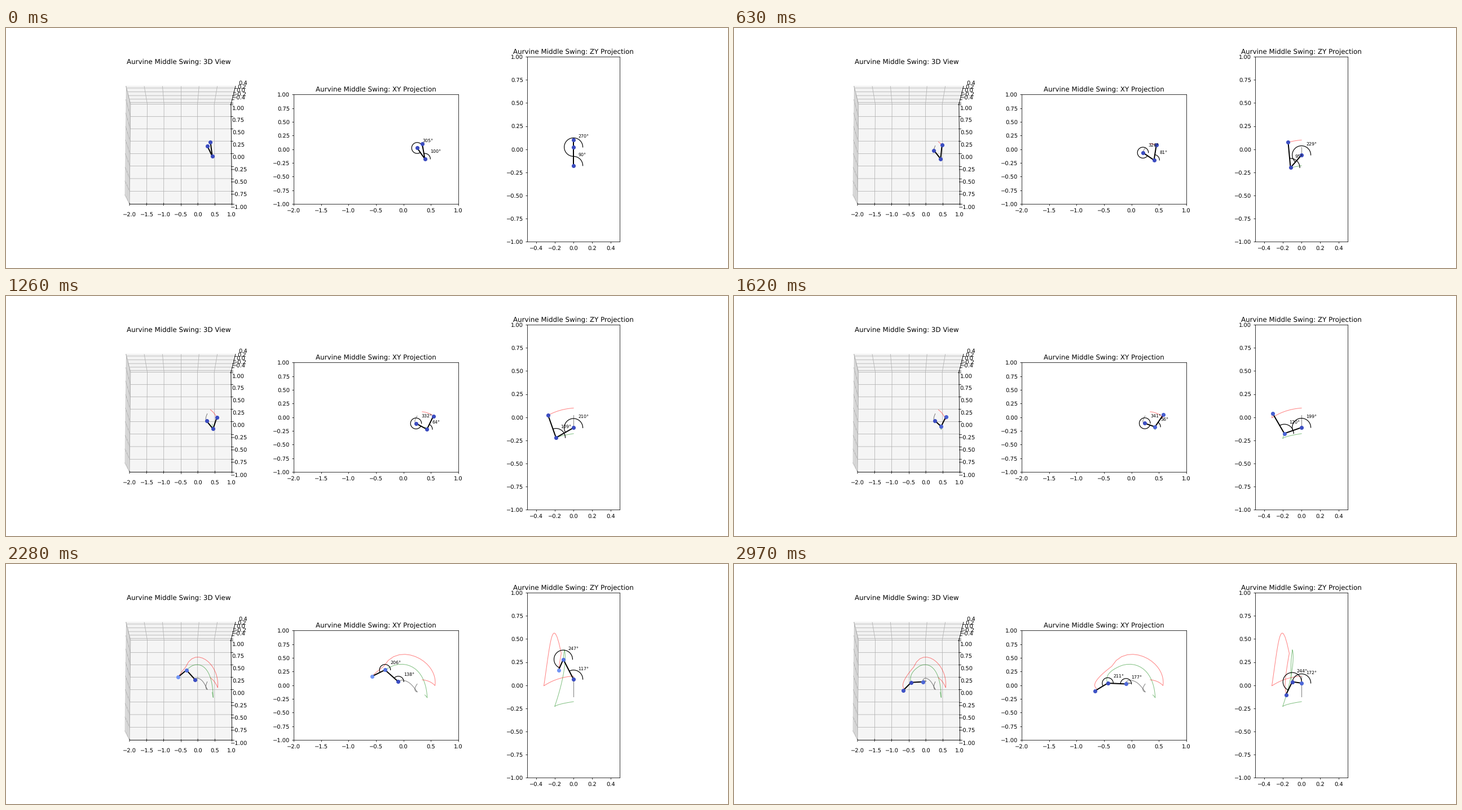
Write a matplotlib script that moves like this. It is 1280 by 427 pixels and loops after 3 s.

```python
import numpy as np
import matplotlib.pyplot as plt
from matplotlib.animation import FuncAnimation

plt.rcParams["text.hinting"] = "none"

FRAMES, INTERVAL = 100, 30
DPI = 1280 / 18
NAME = "Aurvine Middle Swing"
TOP_SPEED = 0.104  # distance per frame at the warm end of the colormap
ARC_RADIUS = 0.1

# Phases of the stroke: first frame, last frame, easing power, curve degree.
LOAD, SWING, FOLLOW = (0, 50, 1, 2), (50, 71, 2, 3), (71, 99, 1, 3)

# Bezier control points (x, y, z); each phase starts where the last one ends.
HANDLE = [(.25, .0225, 0), (.165, -.10, 0), (.253, -.125, 0),
          (.16, 0, 0), (.11, .075, 0), (-.03, .095, 0),
          (-.25, .02, 0), (.17, .05, 0), (-.10, .0225, 0)]
ELBOW = [(.39, -.178, 0), (.417, -.204, -.17), (.433, -.23, -.203),
         (.41, .276, -.03), (.11, .444, -.11), (-.165, .365, -.10),
         (-.58, .21, -.127), (-.415, .017, -.109), (-.432, .037, -.10)]
TIP = [(.3415, .099, 0), (.487, .086, -.18), (.575, -.007, -.32),
       (.64, .458, -.25), (-.10, .813, -.228), (-.36, .345, -.132),
       (-.91, -.073, -.207), (-.53, -.038, -.165), (-.665, -.104, -.168)]


def bezier(points, t):
    points = np.array(points, float)[:, None]
    while len(points) > 1:
        points = points[:-1] + (points[1:] - points[:-1]) * t[:, None]
    return points[0]


def joint_track(controls):
    track, at = np.empty((FRAMES, 3)), 0
    for first, last, power, degree in (LOAD, SWING, FOLLOW):
        t = np.linspace(0, 1, last - first + 1) ** power
        track[first:last + 1] = bezier(controls[at:at + degree + 1], t)
        at += degree
    return track


tracks = np.stack([joint_track(c) for c in (HANDLE, ELBOW, TIP)])
steps = np.linalg.norm(np.diff(tracks, axis=1), axis=2)
energy = (np.pad(steps, ((0, 0), (1, 0))) / TOP_SPEED) ** 2
colors = plt.get_cmap("coolwarm")(np.clip(energy, 0, 1))


class View:
    """One panel: trails, links, joints and, in flat panels, the angles."""

    def __init__(self, ax, title, axes, label_shift=None):
        self.axes, self.label_shift = list(axes), label_shift
        ax.set_title(f"{NAME}: {title}")
        empty = [[]] * len(axes)
        self.trails = [ax.plot(*empty, color=c, lw=1, alpha=0.5)[0]
                       for c in ("black", "green", "red")]
        self.links = ax.plot(*empty, color="black", lw=2)[0]
        self.arcs, self.labels = [], []
        if label_shift:
            for _ in range(2):
                self.arcs.append(ax.plot([], [], color="black", lw=1.2)[0])
                self.labels.append(ax.text(0, 0, "", fontsize=8, zorder=4))
        self.joints = [ax.plot(*empty, "o", ms=6.2, zorder=3)[0] for _ in range(3)]

    def place(self, line, points):
        data = points[:, self.axes].T
        if len(self.axes) == 3:
            line.set_data_3d(*data)
        else:
            line.set_data(*data)

    def update(self, n):
        for track, trail, joint, shade in zip(tracks, self.trails, self.joints, colors):
            self.place(trail, track[:n + 1])
            self.place(joint, track[n:n + 1])
            joint.set_color(shade[n])
        self.place(self.links, tracks[:, n])
        pose = tracks[:, n][:, self.axes]
        for start, end, arc, label in zip(pose, pose[1:], self.arcs, self.labels):
            du, dv = end - start
            angle = np.arctan2(dv, du) % (2 * np.pi)
            sweep = np.linspace(0, angle, 60)
            arc.set_data(start[0] + ARC_RADIUS * np.cos(sweep),
                         start[1] + ARC_RADIUS * np.sin(sweep))
            label.set_position(start + self.label_shift)
            label.set_text(f"{np.degrees(angle):.0f}°")


fig = plt.figure(figsize=(1280.01 / DPI, 427.01 / DPI), dpi=DPI)

ax_space = fig.add_subplot(131, projection="3d")
ax_space.set(xlim=(-2, 1), ylim=(-1, 1), zlim=(-0.5, 0.5))
ax_space.view_init(elev=80, azim=-90)

ax_front = fig.add_subplot(132)
ax_front.set(xlim=(-2, 1), ylim=(-1, 1), aspect="equal")

ax_side = fig.add_subplot(133)
ax_side.set(xlim=(-0.5, 0.5), ylim=(-1, 1), aspect="equal")

views = [
    View(ax_space, "3D View", (0, 1, 2)),
    View(ax_front, "XY Projection", (0, 1), (0.1, 0.1)),
    View(ax_side, "ZY Projection", (2, 1), (0.05, 0.1)),
]


def update(n):
    for view in views:
        view.update(n)


anim = FuncAnimation(fig, update, frames=FRAMES, interval=INTERVAL,
                     repeat=True, repeat_delay=0)
plt.show()
```
